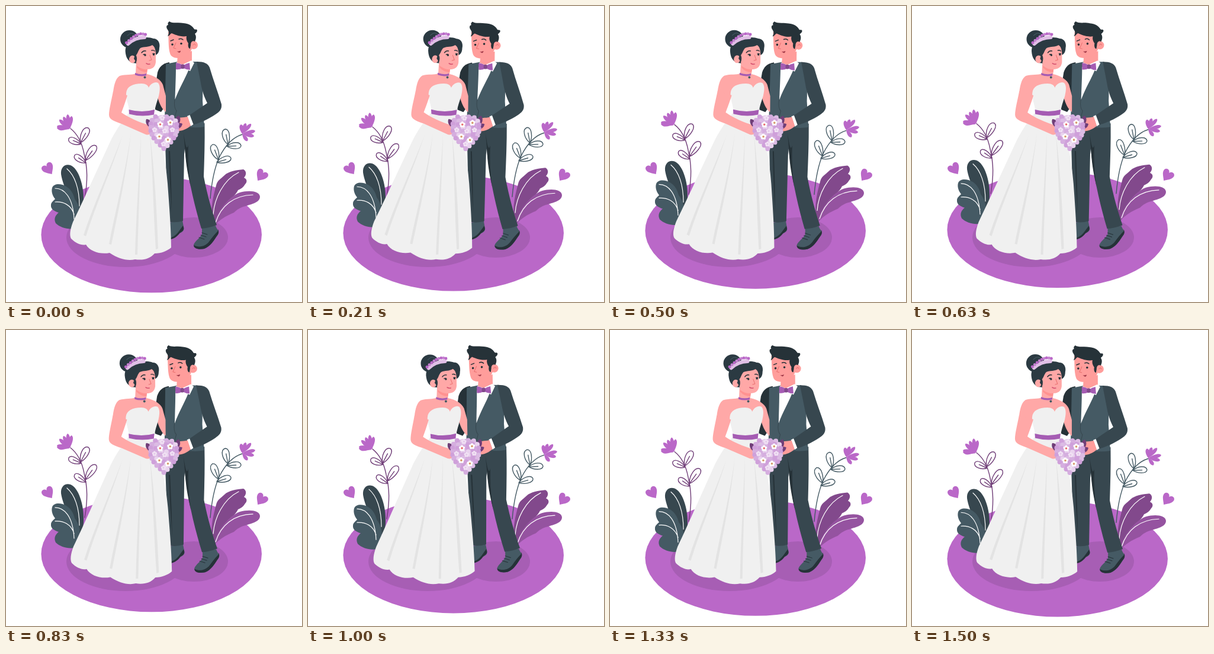
Write an HTML page that moves like this. It is 500 by 500 pixels and loops after 1.54 s.

```html
<!DOCTYPE html>
<html lang="en">
<head>
<meta charset="utf-8">
<title>Wedding couple</title>
<style>
  html, body { margin: 0; width: 100%; height: 100%; overflow: hidden; background: #fff; }
  svg { display: block; width: 100vw; height: 100vh; }
  .line { fill: none; stroke-linecap: round; stroke-linejoin: round; }
  .vein { stroke: #fff; stroke-width: 1.2; }
  .fold { fill: #e3e3e3; }
  .ink { fill: #263238; }
  .coal { fill: #37474f; }
  .slate { fill: #455a64; }
  .plum { fill: #ba68c8; }
  .satin { fill: #a55cb3; }
  .rose { fill: #ffa8a7; }
  .peach { fill: #ff9d9b; }
</style>
</head>
<body>
<svg viewBox="0 0 500 500">
  <g id="ground">
    <ellipse class="plum" cx="245.7" cy="386.3" rx="186.3" ry="98"/>
  </g>

  <g fill="#a75eb4">
    <ellipse cx="202" cy="391" rx="100" ry="50"/>
    <ellipse cx="317.500" cy="391" rx="57.500" ry="34"/>
  </g>

  <g id="plants">
    <g id="stemL" class="line" stroke="#703e78" stroke-width="1.4">
      <path d="M109 207C123 218 129 234 132 250C138 275 138 295 133 325"/>
    </g>
    <g id="stemR" class="line" stroke="#455a64" stroke-width="1.4">
      <path d="M399 217C382 222 370 236 360 256C353 272 348 290 345 325"/>
    </g>
    <g id="flowers" class="plum"></g>

    <path class="coal" d="M123 352C112 335 96 305 93 284C92 272 100 266 109 269C122 274 132 302 131 330C131 340 128 350 123 352Z"/>
    <path class="slate" d="M78 307C81 299 94 300 102 305C109 309 114 317 116 326C124 336 127 350 123 364L114 376C105 378 91 374 84 367C80 359 84 353 89 349C82 347 75 343 76 336C76 332 80 329 83 326C79 321 76 314 78 307Z"/>
    <path class="line vein" d="M103 275C116 286 124 308 124 338M83 308C98 308 113 322 115 360M83 331C97 330 110 336 115 352"/>

    <path fill="#82498c" d="M348 362C345 340 351 318 355 303C357 294 363 292 369 286C376 279 390 277 401 276C407 279 406 286 402 290C407 292 408 297 404 301C401 306 397 309 392 311C388 320 377 327 370 337L352 372Z"/>
    <path fill="#9553a0" d="M351 373C353 352 375 322 395 315C410 311 428 312 429 322C429 333 412 335 405 338C396 340 390 344 385 349C371 355 358 362 351 373Z"/>
    <path class="line vein" d="M350 352C352 325 367 294 393 281M354 366C363 337 385 320 417 319"/>
  </g>

  <g id="hearts" class="plum"></g>

  <g id="couple">
    <!-- groom -->
    <path class="ink" d="M276 95C264 97 259 103 256 112L250 150L252 175L262 179L275 160Z"/>

    <path class="slate" d="M274 366L298 362L300 373C302 379 298 382 293 384C288 391 282 394 272 395Z"/>
    <path class="ink" d="M299 371C302 378 299 380 294 383C288 391 282 394 273 395L273 393C282 391 287 387 291 382Z"/>
    <path class="coal" d="M268 198H307L301 250L299 363Q286 367 273 364Z"/>
    <path class="ink" d="M275 245L277 300L280 350L279 300L277 245Z"/>

    <path class="slate" d="M331 374L354 371C356 378 361 379 358 386C352 395 345 406 335 410C325 412 317 409 317 403C320 396 329 391 331 385Z"/>
    <path class="ink" d="M358 377C361 383 358 386 355 390C350 398 345 406 335 410C325 412 317 410 317 404C326 409 337 406 343 398C348 391 353 385 358 380Z"/>
    <path class="line" stroke="#263238" d="M331 383L340 386M329 387L338 390M326 391L335 394"/>
    <path class="coal" d="M298 198H335.500C336 230 335 260 334 288C340 320 349 350 356 370Q343 375 330 376C320 342 309 300 303 250Z"/>
    <path class="ink" d="M300 215L303 250C304 268 308 288 312 305C308 280 307 255 308 235C305 245 303 235 300 215Z"/>

    <path class="slate" d="M270 98L290 94L324 94C332 115 333 140 332 160L335 204Q318 207 298 203L268 196Z"/>
    <path fill="#fff" d="M287 103L311 100L308 109C303 122 293 138 285.500 158C286 140 287 120 287 103Z"/>
    <path class="line" stroke="#37474f" d="M285 158Q283 172 288 177M288 177L283 196"/>
    <path class="peach" d="M290 82L314 76L314 94L300 102L289 97Z"/>
    <path fill="#fff" d="M288 95L298 99L313 92L318 96L311 110L299 104L288 109Z"/>
    <g class="satin">
      <path d="M287 96Q293 96 298 100V105Q293 108 287 107Z"/>
      <path d="M300 100Q305 97 310 96L311 108Q305 108 300 105Z"/>
      <rect x="295.500" y="98.500" width="6" height="7.500" rx="2" fill="#82498c"/>
    </g>

    <circle class="peach" cx="317" cy="66" r="7"/>
    <path class="peach" d="M274 44C275 58 274 70 277 80C279 88 290 89 297 87C306 84 312 78 314 72L318 46L300 36Z"/>
    <path class="ink" d="M273 51C276 46 275 43 273 40C270 36 271 32 274 32C273 30 273 28 276 26C281 30 291 27 300 29C310 30 315 34 318 39C320 41 321 38 323 41C323 44 321 45 319 47C322 51 321 56 319 60C315 58 312 61 312 66L311 72C308 72 307 67 308 63C305 59 304 55 305 51C296 53 284 48 280 46C277 47 276 51 273 51Z"/>
    <g class="ink">
      <circle cx="281" cy="65" r="1.800"/>
      <circle cx="296" cy="63.500" r="1.800"/>
      <path d="M288.500 76.500Q292 77 295 75.500Q295 78.500 292.500 79Z" fill="#a33c4a"/>
    </g>
    <path class="line" stroke="#263238" stroke-width="1.500" d="M278 59L283 57M292 56Q296 54 299 57"/>
    <path class="line" stroke="#e8706f" d="M287 62L283 71L287 72M316 66Q319 62 320 66"/>

    <!-- bride -->
    <path class="rose" d="M192 118C203 115 213 117 219 114L220 94L239 104L238 115C252 118 262 125 265 133L270 152V179C264 175 259 165 256 154L205 152L181 145C183 130 186 122 192 118Z"/>
    <path fill="#ff9291" d="M221 101Q230 108 239 107L238 112Q228 112 221 104Z"/>
    <path fill="#f0f0f0" d="M203 147C204 136 214 131 229 131C236 131 240 134 241 138C244 131 252 127 257 130C261 135 260 143 258 152C255 162 252 170 251 178H208C208 168 202 157 203 147Z"/>
    <path fill="#f0f0f0" d="M207 181C196 195 187 208 178 225C157 270 131 328 113 365C108 378 107 388 110 393C118 401 128 405 135 403C142 415 160 420 175 417C190 427 205 431 218 428C232 430 243 427 251 418C262 418 272 414 279 408C279 380 276 340 273 300C270 260 260 215 250 181Z"/>
    <g class="fold">
      <path d="M197 218C174 280 148 335 131 387L135 389C152 335 177 280 197 218Z"/>
      <path d="M211 215C202 280 185 345 174 402L178 403C190 345 204 280 211 215Z"/>
      <path d="M228 215C225 280 220 350 218 420L222 420C224 350 227 280 228 215Z"/>
      <path d="M243 215C248 280 249 350 253 411L257 410C255 350 251 280 243 215Z"/>
    </g>
    <path class="satin" d="M207.500 175Q230 181 251 175L250 183.500Q229 188 208 182.500Z"/>
    <path class="rose" d="M181 144C178 160 174 175 174 184C174 192 184 195 195 199L236 217C242 219 247 215 247 209L241 201C226 197 206 188 195 180C198 172 201 164 205 151Z"/>
    <path class="satin" d="M218 113Q228 117 237 114V117.500Q227 120 218 116.500Z"/>
    <circle cx="234.500" cy="120.500" r="2" fill="#455a64"/>

    <g fill="#2b3a42">
      <ellipse cx="208.500" cy="56" rx="15.500" ry="15"/>
      <path d="M202 80C200 68 206 61 215 60C222 53 240 51 249 55C257 55 261 63 259 71C259 79 255 83 251 83L222 97L213 96C205 92 203 86 202 80Z"/>
    </g>
    <path class="rose" d="M219 84C223 80 223 75 227 71C234 68 241 70 247 66C251 68 253 74 253 82L253 95C252 104 246 107 238 107C229 106 222 102 220 96Z"/>
    <ellipse class="rose" cx="213.500" cy="90" rx="5.500" ry="6.500"/>
    <path d="M218 82C221 83 222 89 220 95L216 89Z" fill="#2b3a42"/>
    <path class="line" stroke="#455a64" d="M205 50Q213 42 218 50"/>
    <g class="ink">
      <circle cx="235" cy="83" r="1.700"/>
      <circle cx="249.500" cy="82" r="1.700"/>
    </g>
    <path class="line" stroke="#263238" stroke-width="1.400" d="M229 79Q232 75 236 76M246 75Q249 74 251 76M232 82L235 81.500M248 80.500L251 80.500"/>
    <path class="line" stroke="#e8706f" d="M243 83L246 91L242 92"/>
    <path class="line" stroke="#d65370" stroke-width="1.600" d="M237 97Q240 99 243 98"/>
    <g id="tiara">
      <path class="line" stroke="#e0bfe6" stroke-width="6" d="M206 64Q218 53 234 53"/>
    </g>

    <!-- groom's near arm -->
    <path class="coal" d="M322 94C335 94 341 97 344 104C350 125 358 145 364 166C365 175 360 179 354 183C342 191 327 198 315 201L309 185L340 164C334 152 331 142 329 130Z"/>
    <path fill="#fff" d="M306 186L310.500 184L316.500 200L312 203Z"/>
    <path class="peach" d="M284 193C290 187 299 189 307 187L312 202C306 208 296 212 288 211Z"/>

    <g fill="#703e78">
      <path d="M248 208C240 205 234 198 237 191C243 191 248 196 249 204Z"/>
      <path d="M284 203C283 195 286 187 292 185C297 191 294 199 287 204Z"/>
      <path d="M286 206C288 199 293 196 298 199C297 205 292 208 287 208Z"/>
    </g>
    <g id="bouquet"></g>
  </g>
</svg>
<script>
const LOOP = 1540, STEP = 1000 / 24, LAST = 36;
const PERIOD = 1520, LEAD = 38;
const $ = id => document.getElementById(id);
const add = (id, markup) => $(id).insertAdjacentHTML('beforeend', markup);
const dot = (x, y, r, fill) =>
  `<circle cx="${x}" cy="${y}" r="${r}" fill="${fill}"/>`;

// Length of a segment and the transform that lays the x axis along it
function along(x, y, tx, ty) {
  const turn = Math.atan2(ty - y, tx - x) * 180 / Math.PI;
  return [Math.hypot(tx - x, ty - y), `translate(${x} ${y}) rotate(${turn})`];
}

function leaflet(id, x, y, tx, ty, w = 7) {
  const [len, place] = along(x, y, tx, ty);
  add(id, `<path transform="${place}" d="M0 0C${len * .35} ${-w} ${len * .95} ${-w * 1.15} ${len} 0C${len * .95} ${w} ${len * .35} ${w * .8} 0 0H${len * .65}"/>`);
}

function petal(x, y, tx, ty, w) {
  const [len, place] = along(x, y, tx, ty);
  add('flowers', `<path transform="${place}" d="M0 0C${len * .5} ${-w} ${len * .9} ${-w} ${len} 0C${len * .9} ${w} ${len * .5} ${w} 0 0Z"/>`);
}

function heart(x, y, turn) {
  add('hearts', `<path transform="translate(${x} ${y}) rotate(${turn})" d="M0 11C-4 6 -10 2 -10 -4C-10 -10 -2 -11 0 -5C2 -11 10 -10 10 -4C10 2 4 6 0 11Z"/>`);
}

function blossom(x, y, r, fill, core) {
  let out = '';
  for (let i = 0; i < 5; i++) {
    const a = i * Math.PI * .4 - Math.PI / 2;
    out += dot(x + Math.cos(a) * r, y + Math.sin(a) * r, r * .75, fill);
  }
  return out + dot(x, y, r * .6, core);
}

leaflet('stemL', 126, 231, 139, 206, 8);
leaflet('stemL', 127, 233, 106, 224);
leaflet('stemL', 134, 261, 152, 236, 8);
leaflet('stemL', 135, 265, 116, 252);
leaflet('stemR', 375, 234, 370, 208, 8);
leaflet('stemR', 373, 237, 397, 236);
leaflet('stemR', 359, 260, 349, 234, 8);
leaflet('stemR', 356, 264, 380, 257);

for (const [x, y] of [[86, 203], [90, 192], [97, 187], [104, 183], [111, 186]])
  petal(107, 208, x, y, 4.3);
petal(110, 205, 86, 206, 6);
for (const [x, y] of [[397, 200], [405, 198], [414, 199], [421, 211], [419, 220], [408, 228]])
  petal(399, 216, x, y, 4.2);

heart(71.5, 275, -34);
heart(431.5, 286, 35);

for (let i = 0; i < 9; i++) {
  const u = i / 8;
  add('tiara', dot(203.5 + 32 * u, 62 - 15 * Math.sin(u * Math.PI * .62), 2.5, i % 2 ? '#c583d1' : '#ba68c8'));
}

// Rows of blooms narrowing to a point
const tints = ['#cfa0da', '#dcbce4', '#d5aedf', '#e9d3ee'];
add('bouquet', '<path fill="#d5aedf" d="M245 191Q266 178 288 191Q294 208 279 230L267 245L255 231Q238 212 245 191Z"/>');
for (let row = 0; row < 10; row++) {
  const y = 187 + row * 6;
  const half = [14, 20, 22, 22, 22, 20, 17, 12, 6, 1][row];
  const n = Math.max(1, Math.round(half / 3.4));
  for (let i = 0; i < n; i++) {
    const x = 266.5 + (n > 1 ? half * (2 * i / (n - 1) - 1) : 0);
    add('bouquet', dot(x, y + (i % 2), 4, tints[(i * 3 + row * 2 + (i * row >> 1)) % 4]));
  }
}
for (const [x, y] of [[251, 209], [268, 211], [281, 209], [264, 189], [266, 233]])
  add('bouquet', blossom(x, y, 2.5, '#f1e3f4', '#e4c6e9'));
for (const [x, y, core] of [[260.5, 200, '#e8706f'], [277.5, 197, '#d59a6a'], [259, 220.5, '#d59a6a'], [273.5, 226, '#d59a6a']])
  add('bouquet', blossom(x, y, 3, '#fff', core));

function pose(time) {
  // Frames start on hundredths of a second, up to 4 ms early
  const k = Math.min(LAST, Math.floor((time % LOOP + 4) / STEP));
  const u = (k * STEP + LEAD) % PERIOD / PERIOD;
  const lift = 10 * (1 - Math.abs(1 - 2 * u));
  const sway = u < .25 ? 4 * u : u < .75 ? 2 - 4 * u : 4 * u - 4;
  const rise = `translate(0 ${.5 - lift})`;
  $('ground').setAttribute('transform', rise);
  $('plants').setAttribute('transform', rise);
  $('couple').setAttribute('transform', `rotate(${sway - .1} 236 228)`);
}

const start = performance.now();
function tick() {
  pose(performance.now() - start);
  requestAnimationFrame(tick);
}
tick();
</script>
</body>
</html>
```
